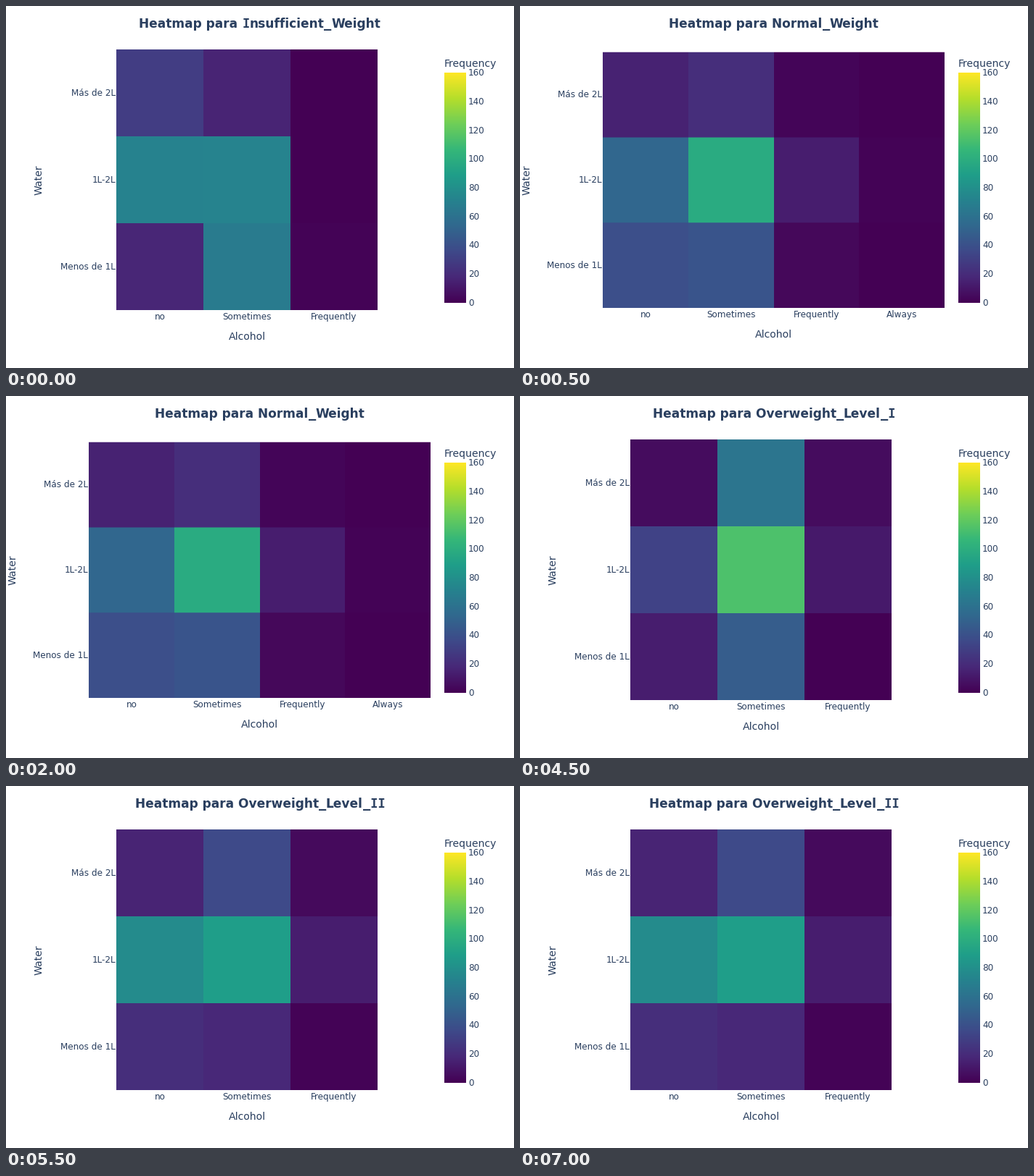
A matplotlib script that plays this animation: 700 by 500 pixels, repeating every 8 s.

```python
from itertools import groupby

import matplotlib.pyplot as plt
import numpy as np
from matplotlib.animation import FuncAnimation
from matplotlib.colors import LinearSegmentedColormap
from matplotlib.patches import Rectangle
from matplotlib.textpath import TextPath

W, H, DPI = 700, 500, 100
INK = "#2a3f5f"
VIRIDIS = LinearSegmentedColormap.from_list("viridis10", [
    "#440154", "#482878", "#3e4989", "#31688e", "#26828e",
    "#1f9e89", "#35b779", "#6ece58", "#b5de2b", "#fde725"], N=1024)
ZMAX = 160
STEP_MS = 500

ALCOHOL = ["no", "Sometimes", "Frequently", "Always"]
WATER = ["Más de 2L", "1L-2L", "Menos de 1L"]

# Steps on screen, class name, counts (rows follow WATER, columns ALCOHOL)
SCENES = [
    (1, "Insufficient_Weight", [[29, 16, 0], [71, 72, 0], [17, 66, 1]]),
    (5, "Normal_Weight", [[15, 21, 2, 0], [53, 98, 13, 1], [39, 42, 3, 0]]),
    (5, "Overweight_Level_I", [[5, 62, 5], [32, 114, 11], [13, 47, 0]]),
    (5, "Overweight_Level_II", [[16, 36, 4], [77, 89, 13], [21, 18, 1]]),
]

# Columns -> left, right, top, bottom, baseline of the vertical axis title
LAYOUT = {3: (152, 512, 60, 420, 50), 4: (114, 585, 63.75, 417, 14)}

plt.rcParams["font.family"] = "DejaVu Sans"
fig = plt.figure(figsize=(W / DPI, H / DPI), dpi=DPI, facecolor="white")
ax = fig.add_axes([0, 0, 1, 1])
ax.axis("off")


def label(x, y, text, px=12, ha="center", **kw):
    """Text with its baseline at pixel row y."""
    return ax.text(x, y, text, size=px * 72 / DPI, color=INK, ha=ha,
                   va="baseline", **kw)


def advance(text, font, px):
    def span(s):
        return TextPath((0, 0), s, size=px, prop=font).get_extents().width
    return span("|" + text + "|") - span("||")


def title(text, px=17):
    """Bold centred heading; I and _ use the wider monospaced shapes."""
    runs = []
    for wide, chars in groupby(text, key=lambda c: c in "I_"):
        family = "DejaVu Sans Mono" if wide else "DejaVu Sans"
        font = {"family": family, "weight": "bold"}
        run = "".join(chars)
        runs.append((run, font, advance(run, font, px)))
    x = W / 2 - sum(r[2] for r in runs) / 2
    parts = []
    for run, font, width in runs:
        parts.append(label(x, 30, run, px, ha="left", **font))
        x += width
    return parts


def heatmap(name, counts):
    cols = len(counts[0])
    left, right, top, bottom, water_x = LAYOUT[cols]
    xs = np.round(np.linspace(left, right, cols + 1))
    ys = np.linspace(top, bottom, len(WATER) + 1)

    parts = title("Heatmap para " + name)
    # Each cell reaches the bottom so that the next row blends over it.
    for r, row in enumerate(counts):
        for c, n in enumerate(row):
            cell = Rectangle((xs[c], ys[r]), xs[c + 1] - xs[c],
                             bottom - ys[r], lw=0, snap=False,
                             facecolor=VIRIDIS(n / ZMAX))
            parts.append(ax.add_patch(cell))
    for c in range(cols):
        parts.append(label((xs[c] + xs[c + 1]) / 2, bottom + 13, ALCOHOL[c]))
    for r, text in enumerate(WATER):
        y = int((ys[r] + ys[r + 1]) / 2) + 4
        parts.append(label(left - 1, y, text, ha="right"))
    parts.append(label((left + right) / 2, bottom + 41, "Alcohol", 14))
    parts.append(label(water_x, 240, "Water", 14, rotation=90,
                       rotation_mode="anchor"))
    return parts


def colorbar(left=604, right=634, top=92, bottom=410):
    ramp = np.linspace(1, 0, bottom - top)[:, None]
    ax.imshow(ramp, cmap=VIRIDIS, vmin=0, vmax=1, aspect="auto",
              interpolation="nearest", extent=(left, right, bottom, top))
    label(left, 84, "Frequency", 14, ha="left")
    for v in range(0, ZMAX + 1, 20):
        y = bottom - (bottom - top) * v / ZMAX
        label(right + 3, round(y) + 4, str(v), ha="left")


colorbar()
groups = [heatmap(name, counts) for _, name, counts in SCENES]
schedule = [k for k, scene in enumerate(SCENES) for _ in range(scene[0])]
ax.set_xlim(0, W)
ax.set_ylim(H, 0)


def update(i):
    for k, parts in enumerate(groups):
        for part in parts:
            part.set_visible(k == schedule[i])
    return []


anim = FuncAnimation(fig, update, frames=len(schedule), interval=STEP_MS,
                     repeat=True, repeat_delay=0, blit=False)
plt.show()
```
